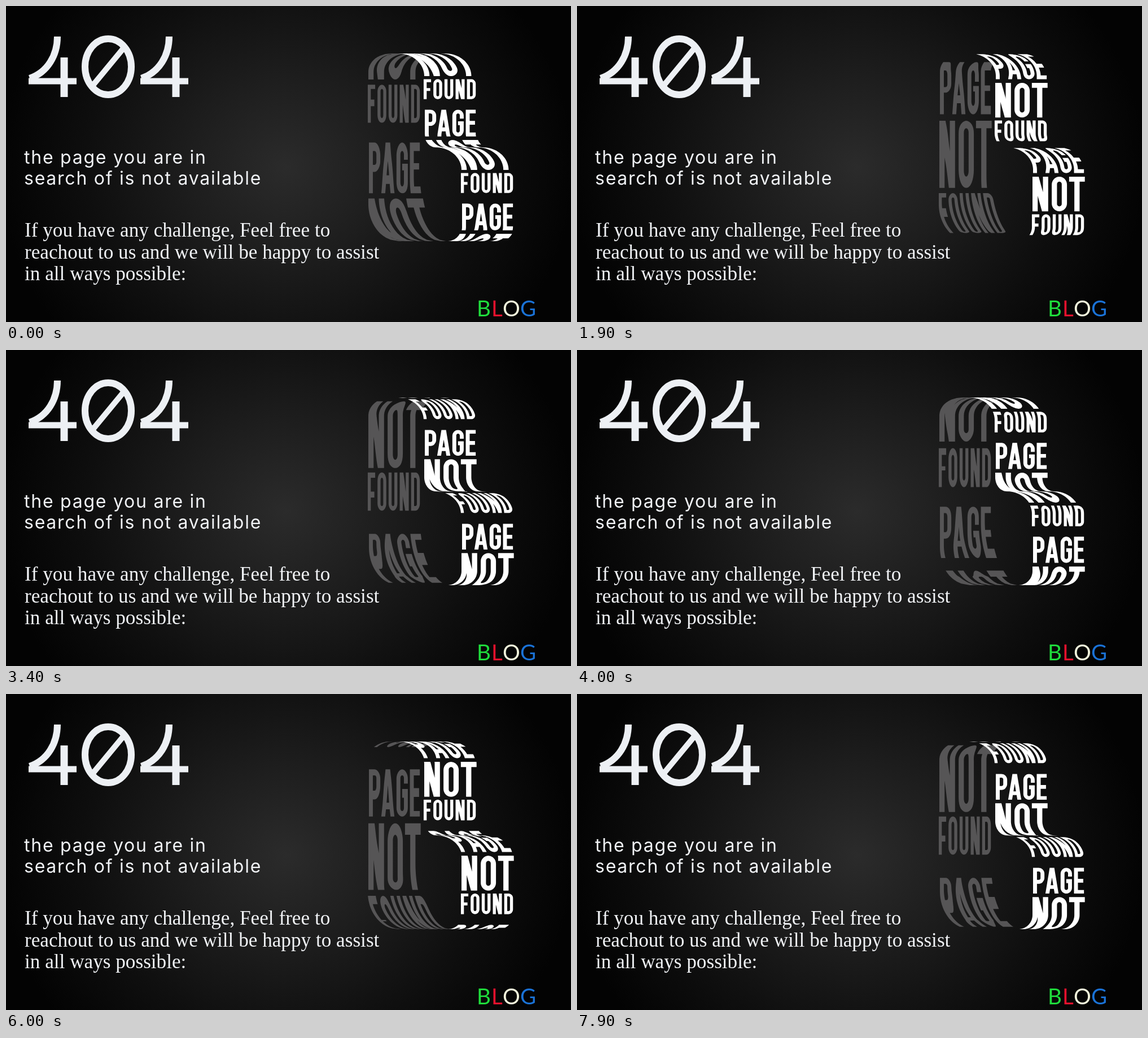
Write an HTML page that moves like this. It is 1001 by 559 pixels and loops after 8 s.

```html
<!DOCTYPE html>
<html lang="en">
<head>
<meta charset="utf-8">
<title>404</title>
<style>
html, body { margin: 0; width: 100%; height: 100%; overflow: hidden; background: #050505; }
svg { display: block; width: 100vw; height: 100vh; }
.lead { font: 400 32px Inter, sans-serif; letter-spacing: 1.75px; }
.body { font: 400 35.2px "Liberation Serif", serif; }
.blog { font: 400 38.5px Lato, sans-serif; }
</style>
</head>
<body>
<svg viewBox="0 0 1001 559">
  <defs>
    <radialGradient id="glow" gradientUnits="userSpaceOnUse" cx="0" cy="0" r="1"
      gradientTransform="translate(497 285) scale(510 470)">
      <stop offset="0" stop-color="#2b2b2b"/>
      <stop offset=".35" stop-color="#1d1d1d"/>
      <stop offset=".7" stop-color="#0e0e0e"/>
      <stop offset="1" stop-color="#030303"/>
    </radialGradient>
    <g id="four" fill="none" stroke="#edf0f4">
      <path d="M91 54C91 87 74 117 42 128" stroke-width="12"/>
      <path d="M40 133H125" stroke-width="11"/>
      <path d="M103 91V161" stroke-width="13"/>
    </g>
  </defs>
  <rect width="1001" height="559" fill="url(#glow)"/>
  <use href="#four"/>
  <use href="#four" x="198"/>
  <g fill="none" stroke="#edf0f4">
    <ellipse cx="181" cy="107.5" rx="41" ry="49.5" stroke-width="12"/>
    <path d="M150 145L212 70" stroke-width="10"/>
  </g>
  <g fill="#f1f3f6">
    <text class="lead" x="32" y="279">the page you are in</text>
    <text class="lead" x="32" y="316">search of is not available</text>
    <text class="body" x="33" y="408">If you have any challenge, Feel free to</text>
    <text class="body" x="33" y="446.5">reachout to us and we will be happy to assist</text>
    <text class="body" x="33" y="485">in all ways possible:</text>
  </g>
  <g class="blog">
    <text x="834" y="548.5" fill="#1fdc3c">B</text>
    <text x="860" y="548.5" fill="#e8112d">L</text>
    <text x="880" y="548.5" fill="#f3f5dc">O</text>
    <text x="911" y="548.5" fill="#1a73d8">G</text>
  </g>
  <path id="back" fill="#565556"/>
  <path id="front" fill="#fff"/>
</svg>
<script>
const TOP = 84, BOTTOM = 416, STAGE = 166, PERIOD = 4500, LOOP = 8000, STEP = 100;

// Condensed capitals built from stems, bars, slanted legs and rounded rings.
const CAP = 70, LEFT = 4, RIGHT = 36, STEM = 11, BAR = 10, GAP = 2.5;

// Closed outline of [x, y, corner radius] points, as closely spaced points.
function outline(pts) {
  const toward = ([x, y], q, r) => {
    const k = r / Math.hypot(q[0] - x, q[1] - y);
    return [x + (q[0] - x) * k, y + (q[1] - y) * k];
  };
  const path = pts.flatMap((p, i) => {
    const r = p[2];
    if (!r) return [p];
    const a = toward(p, pts.at(i - 1), r), b = toward(p, pts[(i + 1) % pts.length], r);
    return Array.from({ length: 9 }, (_, j) => {
      const t = j * Math.PI / 16, ka = 1 - Math.sin(t), kb = 1 - Math.cos(t);
      return [0, 1].map(n => p[n] + (a[n] - p[n]) * ka + (b[n] - p[n]) * kb);
    });
  });
  return path.flatMap((p, i) => {
    const q = path[(i + 1) % path.length];
    const n = Math.max(1, Math.ceil(Math.hypot(q[0] - p[0], q[1] - p[1]) / 2));
    return Array.from({ length: n }, (_, j) => [0, 1].map(k => p[k] + (q[k] - p[k]) * j / n));
  });
}

const box = (x0, y0, x1, y1, r = 0, left = 1, top = 1) => outline([
  [x0, y0, r * left * top], [x1, y0, r * top], [x1, y1, r], [x0, y1, r * left]
]);
const cut = (...args) => box(...args).reverse();
const stem = (x = LEFT, y = 0) => box(x, y, x + STEM, CAP);
const bar = (y, x0 = LEFT, x1 = RIGHT) => box(x0, y, x1, y + BAR);
const leg = (top, foot, w = STEM) => outline([[top, 0], [top + w, 0], [foot + w, CAP], [foot, CAP]]);
const ring = (left, top, h = CAP) => [
  box(LEFT, 0, RIGHT, h, 16, left, top),
  cut(LEFT + STEM, top * BAR, RIGHT - STEM, h - BAR, 5, left, top)
];

const GLYPHS = {
  P: [...ring(0, 1, 43), stem(LEFT, 35)],
  A: [leg(13, 1), leg(15, 27), bar(47, 9, 30)],
  G: [...ring(1, 1), cut(RIGHT - STEM, 24, RIGHT, 32), bar(31, 20)],
  E: [stem(), bar(0, LEFT, 32), bar(30, LEFT, 30), bar(60, LEFT, 32)],
  N: [stem(), stem(26), leg(LEFT, 24, 13)],
  O: ring(1, 1),
  T: [bar(0, 1, 34), stem(12)],
  F: [stem(), bar(0, LEFT, 31), bar(31, LEFT, 28)],
  U: ring(1, 0),
  D: ring(0, 1)
};
const LINES = [
  { text: 'PAGE', x: -1.5, y: 0, h: 44, track: -0.7 },
  { text: 'NOT', x: -3.4, y: 50, h: 59, track: 1 },
  { text: 'FOUND', x: -3, y: 114, h: 34, track: 2 }
];

const contours = LINES.flatMap(({ text, x, y, h, track }) => {
  const s = h / CAP;
  return [...text].flatMap(ch => {
    const left = x, shapes = GLYPHS[ch];
    x += (Math.max(...shapes.flat().map(p => p[0])) + GAP + track) * s;
    return shapes.map(c => c.map(p => [left + p[0] * s, y + p[1] * s]));
  });
});

const clamp = y => Math.min(BOTTOM, Math.max(TOP, y));
const mod = (a, n) => ((a % n) + n) % n;
const bend = (y, cx, rx, cy, ry) => cx + rx * Math.sqrt(Math.max(0, 1 - ((y - cy) / ry) ** 2));

// Left edge of each sheet at height y.
function frontX(y) {
  if (y < 124) return bend(y, 695, 46, 124, 40);
  if (y < 225) return 741;
  if (y < 250) return bend(y, 761, -20, 225, 25);
  if (y < 290) return bend(y, 761, 46, 290, 40);
  return y < 391 ? 807 : bend(y, 782, 25, 391, 25);
}

// The right side of the back sheet starts its lower turn earlier.
function backX(y, u) {
  if (y < 116) return bend(y, 682, -40, 116, 32);
  const turn = 66 + 0.6 * u, start = BOTTOM - turn;
  return y < start ? 642 : bend(y, 696, -54, start, turn);
}

// Rows are squeezed towards the flat part of each fold.
function frontY(v) {
  const d = v - TOP - STAGE * Math.round((v - TOP) / STAGE);
  return clamp(v - 0.75 * d * Math.exp(-Math.abs(d) / 15));
}

// The back sheet ripples slightly and bunches up before the lower fold.
function backY(v) {
  const edge = Math.max(0, Math.min(1, (BOTTOM - v) / 30, (v - TOP) / 20));
  const ripple = 2.5 * Math.cos((v - 131) * Math.PI / 32) - 1.5;
  return clamp(v + ripple * edge + 11 * Math.exp(-(((v - 384) / 13) ** 2)));
}

function ribbon(start, scale, mapX, mapY) {
  const size = STAGE * scale;
  let d = '';
  for (let s = mod(start, size) - size; s < BOTTOM; s += size) {
    for (const c of contours) {
      const pts = c.map(([u, v]) => {
        const y = mapY(s + v * scale);
        return (mapX(y, u) + u).toFixed(2) + ' ' + y.toFixed(2);
      });
      d += 'M' + pts.join('L') + 'Z';
    }
  }
  return d;
}

const front = document.getElementById('front'), back = document.getElementById('back');
let shown = -1;

function draw(now) {
  const t = Math.floor((now % LOOP) / STEP) * STEP;
  if (t !== shown) {
    shown = t;
    const shift = STAGE * t / PERIOD;
    front.setAttribute('d', ribbon(183 + shift, 1, frontX, frontY));
    back.setAttribute('d', ribbon(243 - 2 * shift, 2, backX, backY));
  }
}

function tick(now) {
  draw(now);
  requestAnimationFrame(tick);
}
draw(0);
requestAnimationFrame(tick);
</script>
</body>
</html>
```
